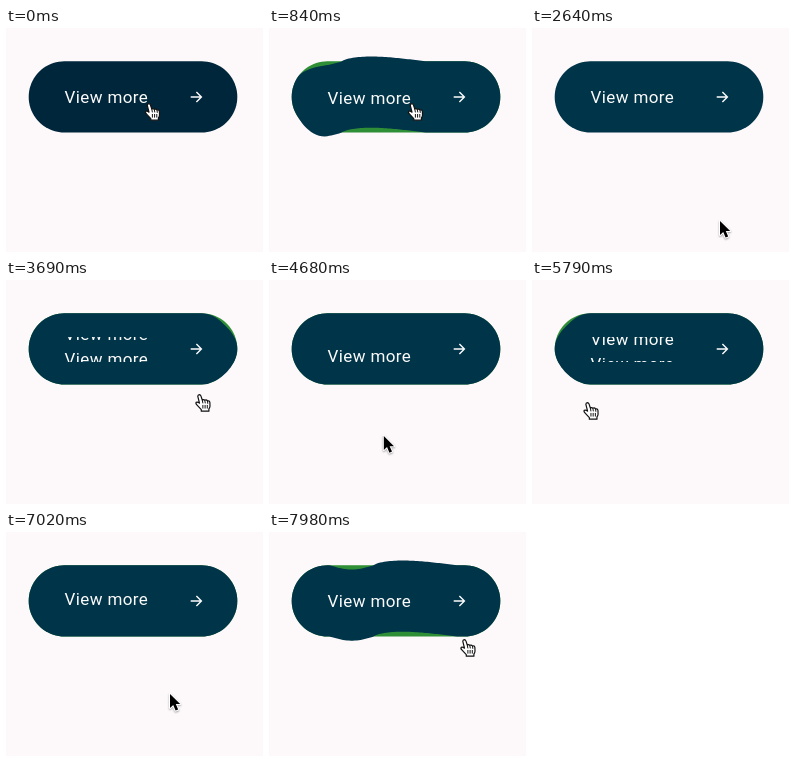
Animation of 257 by 224 pixels, one loop 8 s. Source, as an HTML page with a canvas:

```html
<!DOCTYPE html>
<html lang="en">
<head>
<meta charset="utf-8">
<title>Liquid button</title>
<style>
  html, body { margin: 0; width: 100%; height: 100%; overflow: hidden; background: #fdf8f9; }
  canvas { display: block; width: 257px; height: 224px; }
</style>
</head>
<body>
<canvas id="stage"></canvas>
<script>
const LOOP = 8000, W = 257, H = 224;
const BG = '#fdf8f9', NAVY = '#003449', GREEN = '#2f8f36';
const BTN = { left: 22.7, right: 231.3, top: 33.3, bottom: 104.5 };
const RADIUS = (BTN.bottom - BTN.top) / 2;
const MID = (BTN.top + BTN.bottom) / 2;
const SPAN = BTN.right - BTN.left;
const ROLL = 600, LINE = 25, SPEED = 0.42;

// Pointer entering and leaving the hover area
const hovers = [[360, 2100], [3480, 4565], [5640, 6620], [7280, 9999]];

// Waves through the skin: start time and the side they come from
const waves = [
  { at: 360, side: 1 }, { at: 3640, side: 1 },
  { at: 5740, side: -1 }, { at: 7575, side: 1 }
];

// Pointer tip: time, x, y
const path = [
  [0, 143, 76], [1680, 143, 76], [1890, 163, 101], [2110, 181, 135],
  [2460, 189, 190], [2640, 188, 193], [3150, 188, 193], [3480, 192, 132],
  [3690, 193.5, 115], [4100, 184, 102], [4400, 154, 114], [4565, 132, 137],
  [4680, 115, 156], [4900, 72, 163], [5200, 43, 163], [5400, 43, 163],
  [5640, 50, 135], [5790, 55.5, 123], [6150, 84, 106], [6400, 120, 111],
  [6620, 147, 140], [6990, 164, 162], [7020, 164, 162], [7280, 180, 132],
  [7770, 195.5, 108], [8000, 195.5, 108]
];

const canvas = document.getElementById('stage');
const ctx = canvas.getContext('2d');
const scale = window.devicePixelRatio || 1;
canvas.width = W * scale;
canvas.height = H * scale;

const clamp = v => Math.max(0, Math.min(1, v));

// cubic-bezier(.25, .1, .25, 1)
function ease(x) {
  if (x <= 0) return 0;
  if (x >= 1) return 1;
  const curve = (u, a, b) => 3 * u * (1 - u) ** 2 * a + 3 * u * u * (1 - u) * b + u ** 3;
  let lo = 0, hi = 1;
  for (let i = 0; i < 20; i++) {
    const u = (lo + hi) / 2;
    if (curve(u, 0.25, 0.25) < x) lo = u; else hi = u;
  }
  return curve(lo, 0.1, 1);
}

function slope(i, axis) {
  const a = path[i - 1], b = path[i], c = path[i + 1];
  if (!a || !c) return 0;
  const still = (p, q) => p[1] === q[1] && p[2] === q[2];
  if (still(a, b) || still(b, c)) return 0;
  return (c[axis] - a[axis]) / (c[0] - a[0]);
}

function pointer(t) {
  let i = 0;
  while (i < path.length - 2 && path[i + 1][0] <= t) i++;
  const a = path[i], b = path[i + 1], d = b[0] - a[0], u = (t - a[0]) / d;
  return [1, 2].map(k =>
    (1 + 2 * u) * (1 - u) ** 2 * a[k] + u * (1 - u) ** 2 * d * slope(i, k) +
    u * u * (3 - 2 * u) * b[k] + u * u * (u - 1) * d * slope(i + 1, k));
}

// A short swing down, then a quick rise that falls away slowly
function swing(s) {
  if (s <= 0 || s >= 128) return 0;
  return s < 44 ? 4.2 * Math.sin(Math.PI * s / 44)
                : -4.8 * Math.sin(Math.PI * ((s - 44) / 84) ** 0.65);
}

function shift(x, t) {
  let dy = 0;
  for (const w of waves) {
    const front = (t - w.at) * SPEED;
    if (front <= 0 || front > 600) continue;
    const u = w.side > 0 ? BTN.right - x : x - BTN.left;
    const back = front - SPAN;
    dy += swing(front - u) * clamp(u / 50);
    if (back > 0) dy += 0.4 * clamp(1 - back / 150) * swing(back - (SPAN - u));
  }
  return dy;
}

// Dent in the cap where a wave begins
function dent(side, t) {
  let sum = 0;
  for (const w of waves) {
    const age = (t - w.at + 70) / 270;
    if (w.side === side && age > 0 && age < 1) sum += 2 * Math.sin(Math.PI * age);
  }
  return sum;
}

function skin(t, front) {
  ctx.beginPath();
  const add = (x, y) => ctx.lineTo(x, y + (front ? shift(x, t) : 0));
  for (const side of [1, -1]) {
    const cx = side > 0 ? BTN.right - RADIUS : BTN.left + RADIUS;
    const depth = dent(side, t);
    for (let i = 0; i <= 40; i++) {
      const a = (i / 40 - 0.5) * Math.PI;
      const lower = side * a > 0;
      const r = RADIUS - (front || lower ? depth * Math.sin(2 * a) ** 2 : 0);
      add(cx + side * r * Math.cos(a), MID + side * r * Math.sin(a));
    }
    const edge = side > 0 ? BTN.bottom : BTN.top;
    for (let i = 1; i < 70; i++) add(cx - side * i * (SPAN - 2 * RADIUS) / 70, edge);
  }
  ctx.closePath();
  ctx.fill();
}

function label(t) {
  let offset = 0;
  for (const [enter, leave] of hovers) {
    if (t >= enter) offset = LINE * (ease((t - enter) / ROLL) - ease((t - leave) / ROLL));
  }
  ctx.save();
  ctx.beginPath();
  ctx.rect(50, 57, 110, 25);
  ctx.clip();
  ctx.font = '400 17px Roboto, sans-serif';
  ctx.letterSpacing = '0.4px';
  ctx.fillStyle = '#fbfbfb';
  ctx.fillText('View more', 58.5, 75 - offset);
  ctx.fillText('View more', 58.5, 75 - offset + LINE);
  ctx.restore();
}

function arrow() {
  ctx.strokeStyle = '#fbfbfb';
  ctx.lineWidth = 1.4;
  ctx.lineCap = 'butt';
  ctx.lineJoin = 'miter';
  ctx.stroke(new Path2D('M184.7 69H195M190.4 64L195.4 69L190.4 74'));
}

const handShape = new Path2D(
  'M-1.7 1.4Q-1.6 -.3 -.2 -.4Q1 -.4 1.4 .9L2.8 5Q4.2 4 5.3 5.3' +
  'Q7 4.5 8 6Q10 5.4 10.4 7.6L10.5 11.3Q10.3 13 9.4 14V16.2H1.8V14.6' +
  'L-2.4 10.2Q-4.2 8.4 -3.2 7.3Q-2 6.6 0 8.2Z');
const handLines = new Path2D('M2.8 5L3.4 8.4M5.3 5.3L5.8 8.4M8 6L8.3 8.8M3.4 10V13.6M5.6 10V13.6M7.8 10V13.6');
const tipShape = new Path2D('M0 0V14L3.2 11L5.6 16.6L8.2 15.5L5.8 10.1H10.2Z');

function cursor(t) {
  const [x, y] = pointer(t);
  const hand = t < 360 || hovers.some(([enter, leave]) => t >= enter && t < leave);
  ctx.save();
  ctx.translate(x, y);
  ctx.lineJoin = 'round';
  if (hand) {
    ctx.fillStyle = '#fff';
    ctx.strokeStyle = '#111';
    ctx.lineWidth = 1.2;
    ctx.fill(handShape);
    ctx.stroke(handShape);
    ctx.lineWidth = 1;
    ctx.stroke(handLines);
  } else {
    ctx.shadowColor = 'rgba(0,0,0,.35)';
    ctx.shadowBlur = 2 * scale;
    ctx.shadowOffsetY = scale;
    ctx.strokeStyle = '#fff';
    ctx.lineWidth = 2;
    ctx.stroke(tipShape);
    ctx.shadowColor = 'transparent';
    ctx.fillStyle = '#000';
    ctx.fill(tipShape);
  }
  ctx.restore();
}

function draw(t) {
  ctx.setTransform(scale, 0, 0, scale, 0, 0);
  ctx.fillStyle = BG;
  ctx.fillRect(0, 0, W, H);
  if (waves.some(w => t > w.at - 70 && t < w.at + 1400)) {
    ctx.fillStyle = GREEN;
    skin(t, false);
  }
  ctx.fillStyle = t < 30 ? '#00263b' : t < 60 ? '#002d42' : NAVY;
  skin(t, true);
  label(t);
  arrow();
  cursor(t);
}

const start = performance.now();
function tick() {
  draw((performance.now() - start) % LOOP);
  requestAnimationFrame(tick);
}
draw(0);
requestAnimationFrame(tick);
</script>
</body>
</html>
```
